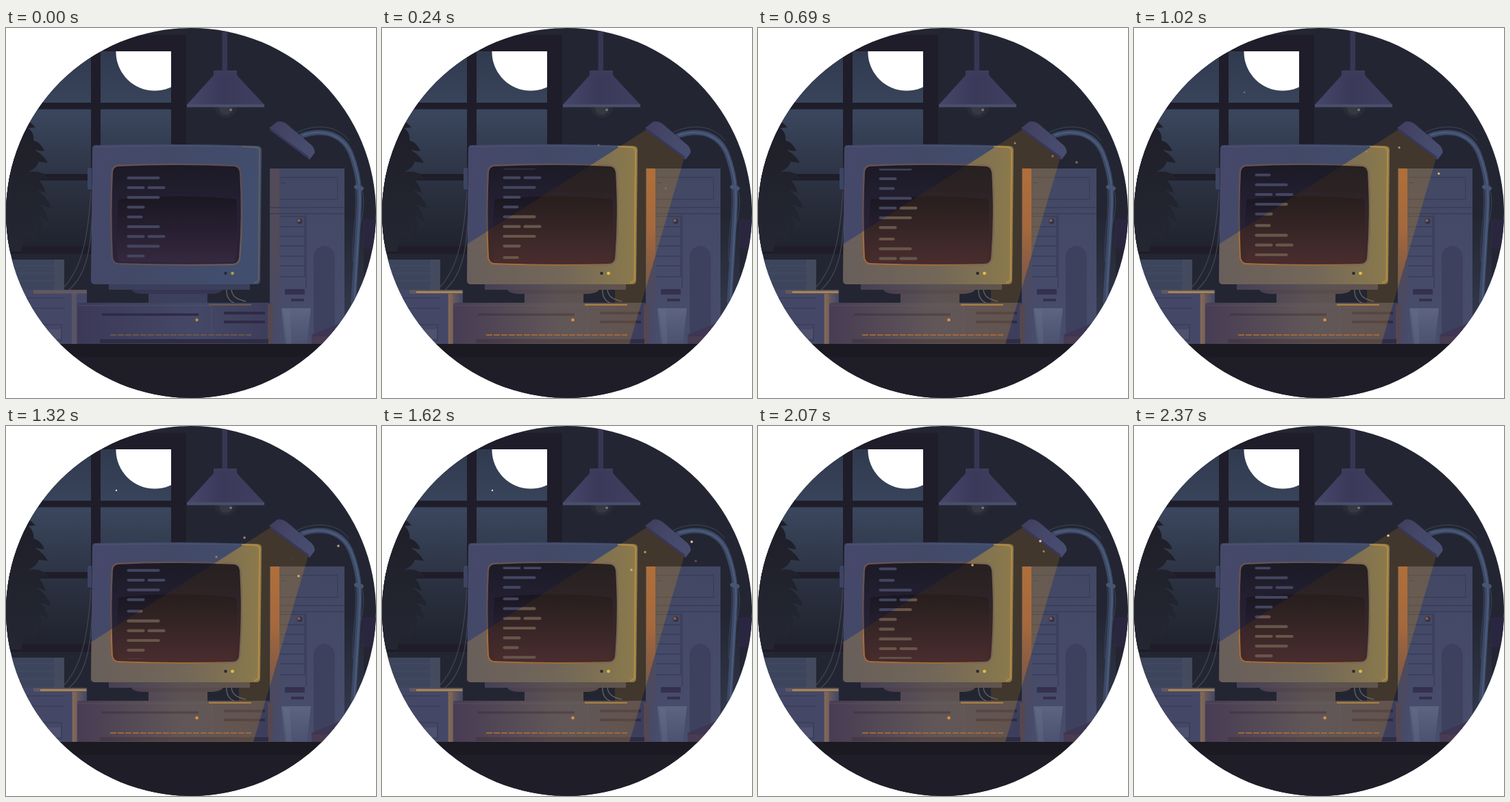
An HTML page that plays this animation: 540 by 540 pixels, repeating every 2400 ms.

```html
<!DOCTYPE html>
<html lang="en">
<head>
<meta charset="utf-8">
<title>Night desk</title>
<style>
html, body { margin: 0; width: 100%; height: 100%; overflow: hidden; background: #fff; }
svg { display: block; width: 100vw; height: 100vh; }
</style>
</head>
<body>
<svg viewBox="0 0 540 540" fill="none">
<defs>
  <clipPath id="stage"><circle cx="270" cy="270" r="270"/></clipPath>
  <clipPath id="pane"><path d="M0 34H241V330H0z"/></clipPath>
  <clipPath id="cone"><path d="M388 147L441 190L361 461H96V334L125 315z"/></clipPath>
  <clipPath id="text"><path d="M160 205.5H340V339.5H160z"/></clipPath>
  <linearGradient id="sky" x2="0" y2="1">
    <stop stop-color="#303a4f"/><stop offset=".32" stop-color="#3a465d"/>
    <stop offset=".65" stop-color="#2c3343"/><stop offset="1" stop-color="#21232e"/>
  </linearGradient>
  <linearGradient id="leaf" x2="0" y2="1">
    <stop stop-color="#1e1e28"/><stop offset=".35" stop-color="#20212b"/><stop offset="1" stop-color="#242732"/>
  </linearGradient>
  <linearGradient id="shade">
    <stop stop-color="#47476b"/><stop offset=".45" stop-color="#3b395a"/><stop offset="1" stop-color="#403f60"/>
  </linearGradient>
  <linearGradient id="haze" x2="0" y2="1">
    <stop stop-color="#343a50" stop-opacity="0"/><stop offset="1" stop-color="#363d53"/>
  </linearGradient>
  <linearGradient id="body" x2="1" y2=".25">
    <stop stop-color="#46486a"/><stop offset=".45" stop-color="#424967"/><stop offset="1" stop-color="#414e6d"/>
  </linearGradient>
  <linearGradient id="unit">
    <stop stop-color="#3c3957"/><stop offset=".6" stop-color="#444866"/><stop offset="1" stop-color="#3c3d5a"/>
  </linearGradient>
  <linearGradient id="tower" x2="0" y2="1">
    <stop stop-color="#424864"/><stop offset="1" stop-color="#474d6b"/>
  </linearGradient>
  <linearGradient id="edge" x2="0" y2="1">
    <stop stop-color="#554b57"/><stop offset=".5" stop-color="#504a5b"/><stop offset="1" stop-color="#464a69"/>
  </linearGradient>
  <linearGradient id="cup" x2="0" y2="1">
    <stop stop-color="#5c6480"/><stop offset="1" stop-color="#4b5270"/>
  </linearGradient>
  <linearGradient id="head" x2="1" y2=".6">
    <stop stop-color="#413d5d"/><stop offset=".5" stop-color="#454768"/><stop offset="1" stop-color="#484d70"/>
  </linearGradient>
  <linearGradient id="glass" x2="0" y2="1">
    <stop stop-color="#1b1a25"/><stop offset=".35" stop-color="#231f31"/><stop offset="1" stop-color="#2c2439"/>
  </linearGradient>
  <linearGradient id="gloss" x2="0" y2="1">
    <stop stop-color="#1a1721"/><stop offset=".45" stop-color="#251e2f"/><stop offset="1" stop-color="#35293f"/>
  </linearGradient>
  <linearGradient id="gold">
    <stop stop-color="#a08046" stop-opacity=".4"/><stop offset=".55" stop-color="#a88545" stop-opacity=".48"/>
    <stop offset="1" stop-color="#be9834" stop-opacity=".6"/>
  </linearGradient>
  <linearGradient id="amber" x2="0" y2="1">
    <stop stop-color="#46300f" stop-opacity=".26"/><stop offset=".45" stop-color="#4a2f12" stop-opacity=".32"/>
    <stop offset="1" stop-color="#5f301c" stop-opacity=".5"/>
  </linearGradient>
  <linearGradient id="ember">
    <stop stop-color="#5c434c" stop-opacity=".36"/><stop offset=".5" stop-color="#8a6c46" stop-opacity=".4"/>
    <stop offset="1" stop-color="#9a7438" stop-opacity=".4"/>
  </linearGradient>
  <linearGradient id="strip" x2="0" y2="1">
    <stop stop-color="#b06f3a"/><stop offset=".35" stop-color="#a5683d"/><stop offset="1" stop-color="#684846" stop-opacity=".2"/>
  </linearGradient>
  <linearGradient id="warm">
    <stop stop-color="#a07848" stop-opacity=".6"/><stop offset="1" stop-color="#a07848" stop-opacity="0"/>
  </linearGradient>
  <linearGradient id="rim" x2="1" y2="1">
    <stop stop-color="#6d5351"/><stop offset=".5" stop-color="#5b4d55"/><stop offset="1" stop-color="#705d54"/>
  </linearGradient>
  <linearGradient id="glow">
    <stop stop-color="#a86c3a"/><stop offset=".7" stop-color="#9a6a3e"/><stop offset="1" stop-color="#786a54"/>
  </linearGradient>
  <path id="case" d="M131 171Q250 168 366 172Q373 172 373 178L371 368Q371 374 365 374H130Q124 374 124 368L126 176Q126 171 131 171z"/>
  <path id="screen" d="M163 202Q250 198 333 202Q340 203 341 211Q345 275 340 336Q339 343 331 344Q248 346 164 343Q157 342 156 335Q153 272 156 210Q157 203 163 202z"/>
  <path id="code"/>
</defs>

<g clip-path="url(#stage)">
  <path fill="#232632" d="M0 0H540V540H0z"/>

  <!-- window -->
  <path fill="#1f1d29" d="M0 10H263V330H0z"/>
  <path fill="url(#sky)" d="M0 34H241V318H0z"/>
  <circle cx="217" cy="35" r="56.5" fill="#fff" clip-path="url(#pane)"/>
  <path fill="#1f1d29" d="M124 34H138V330H124zM0 109H241V118.500H0zM0 213H241V222.500H0z"/>
  <path fill="url(#leaf)" d="M0 125Q30 130 43 145L33 146Q42 155 40 164Q52 168 56 180L42 178Q56 186 61 197L48 195Q46 203 33 210Q55 207 62 220L46 220Q55 229 58 241L45 236Q60 246 66 263L50 258Q60 269 62 283L48 273Q54 286 51 296L40 285Q46 302 40 312L28 300L22 326H0z"/>

  <!-- ceiling lamp -->
  <circle cx="321" cy="114" r="17" fill="#292b36"/>
  <circle cx="321" cy="117" r="10" fill="#353741"/>
  <circle cx="328" cy="119.500" r="1.800" fill="#7b7a7a"/>
  <path fill="#393555" d="M315.500 0H323V63H315.500z"/>
  <path fill="#3e3b5a" d="M303 62H337V70H303z"/>
  <path fill="url(#shade)" d="M303 69H337L377 112H264z"/>
  <path fill="#4a506c" d="M264 111.500H377V115.500H264z"/>

  <!-- back right -->
  <path fill="#2b2640" d="M521 279H540V322H521z"/>
  <path fill="url(#haze)" d="M494 275H522V461H494z"/>

  <!-- tower -->
  <path fill="url(#tower)" d="M385 205H494V461H385z"/>
  <path fill="url(#edge)" d="M386 206H399V461H386z"/>
  <g stroke="#3a3d59" stroke-width="1.300">
    <path d="M400 218H484V250H400M385 262H494M385 271H494M401 226H408"/>
    <path d="M400 275H436V363H400M400 290H436M400 304H436M400 318H436M400 333H436M400 347H436M438 271V380"/>
  </g>
  <path fill="#3d415e" d="M449 461V334A15.500 16 0 0 1 480 334V461z"/>
  <path fill="#35304d" d="M407 381H436V389H407zM416 395H435V399H416z"/>
  <circle cx="428.500" cy="282" r="4" fill="#34304a"/>
  <circle cx="427.500" cy="281" r="2.200" fill="#8b5e45"/>

  <!-- desk lamp -->
  <g stroke-linecap="round">
    <path stroke="#3b4560" d="M424 153C452 138 486 143 500 164M519 235C532 275 498 310 510 392M510 236C512 280 505 300 506 340"/>
    <path stroke="#3d4864" stroke-width="7.500" d="M432 157C466 146 493 156 504 185C514 212 517 235 515 268L507 400"/>
    <path stroke="#495b7c" stroke-width="2.500" d="M434 156C466 146 494 158 505 186C515 214 518 236 516 268L508.500 396"/>
    <path stroke="#475472" stroke-width="6" d="M511 232L519 234"/>
  </g>

  <!-- cup and book -->
  <path fill="#3e3652" d="M446 448L494 428V461H446z"/>
  <path fill="#473c52" d="M446 450H494V461H446z"/>
  <path fill="url(#cup)" d="M402 409H445L439 461H407z"/>
  <path fill="#677089" opacity=".35" d="M405 411H414L417 461H409z"/>

  <!-- left boxes -->
  <path fill="#3d455d" d="M0 338H85V382H0z"/>
  <path fill="#4a505f" opacity=".6" d="M70 338H85V382H70z"/>
  <path stroke="#454d66" d="M0 347H70M0 358H70M0 369H70"/>
  <path fill="#444866" d="M0 382H118V461H0z"/>
  <path fill="#585367" d="M96 386H103V461H96z"/>
  <path fill="#62595f" d="M40 382.500H116Q119 383 118 387.500H40z"/>
  <path stroke="#3a3d59" stroke-width="1.500" d="M28 394H86M28 409H86M50 433H81V456H50z"/>
  <path fill="#4f526c" d="M54 440H80V454H60z"/>
  <path stroke="#434858" stroke-width="1.100" d="M124 238C120 300 112 352 82 381M126 244C126 320 118 360 92 382"/>

  <!-- light on the wall and tower -->
  <g class="lit">
    <g clip-path="url(#cone)">
      <path fill="#c58712" fill-opacity=".18" d="M340 140H450V461H340z"/>
      <path fill="#bd8d35" fill-opacity=".13" d="M385 205H494V461H385z"/>
      <path fill="url(#strip)" d="M386 205H399V461H386z"/>
    </g>
    <path fill="url(#warm)" d="M97 388H117V461H97z"/>
    <path stroke="#a98552" stroke-width="3" d="M50 385.500H117"/>
  </g>
  <path stroke="#68665f" stroke-width="1.300" d="M322 380C321 392 326 399 333 401M329 380C329 391 336 396 350 399"/>
  <path fill="url(#head)" d="M384 146L396 136.500Q402 135 409 139.500L446 171Q452 178 450 183L443 192z"/>
  <path stroke="#39375a" stroke-width="3" d="M386 148L442 189.500"/>

  <!-- system unit -->
  <path fill="#3c405c" d="M208 386H294V402H208z"/>
  <path fill="#373552" d="M183 381H317Q313 388 300 388H198Q185 388 183 381z"/>
  <path fill="#3a3f5b" d="M150 374H356V382H150z"/>
  <path fill="url(#unit)" d="M108 401H384Q388 401 388 406V461H104V406Q104 401 108 401z"/>
  <path fill="#54474f" d="M382 403H389V461H382z"/>
  <path stroke="#4d506c" d="M300 404V448M105 405H300"/>
  <path stroke="#6e594f" stroke-width="1.800" d="M296 404H358"/>
  <path fill="#302a45" d="M140 416.500H281V420H140zM318 414H378V418H318zM318 427H378V431H318z"/>
  <path fill="#302c45" d="M137 454H383V460H137z"/>
  <path stroke="#6a554f" stroke-width="1.800" stroke-dasharray="9 2" d="M152 448H358"/>
  <circle cx="278.500" cy="426" r="2.200" fill="#c0893c"/>

  <!-- monitor -->
  <path fill="#3b4462" d="M125 204H121Q119 204 119 207V233Q119 236 122 236H125z"/>
  <use href="#case" fill="url(#body)"/>
  <path stroke="#505675" d="M129 173.500Q250 170.500 364 174"/>
  <path id="trim" stroke="#69635e" stroke-width="1.500" d="M344 173L364 174Q370 174.500 370 180L368.500 366Q368 371 362 371.500"/>

  <g class="lit">
    <g clip-path="url(#cone)">
      <use href="#case" fill="url(#gold)"/>
      <path fill="url(#ember)" d="M150 374H356V382H317Q313 388 294 388V401H208V388Q185 388 183 382H150z"/>
      <path fill="url(#ember)" d="M104 401H388V461H104z"/>
    </g>
    <path stroke="#bd8d42" stroke-width="1.600" d="M344 173L364 174Q370 174.500 370 180L368.500 366Q368 371 362 371.500M296 404H358"/>
    <path stroke="#a0673d" stroke-width="1.800" stroke-dasharray="9 2" d="M152 448H358"/>
  </g>

  <use href="#screen" stroke="url(#rim)" stroke-width="4.500"/>
  <use href="#screen" class="lit" stroke="url(#glow)" stroke-width="4.500" clip-path="url(#cone)"/>
  <use href="#screen" fill="url(#glass)"/>
  <path fill="url(#gloss)" d="M164 250Q250 241 336 250Q340 296 334 342Q250 344 164 341Q160 296 164 250z"/>
  <g class="lit" clip-path="url(#cone)"><use href="#screen" fill="url(#amber)"/></g>
  <g clip-path="url(#text)" stroke-width="4" stroke-linecap="round">
    <use href="#code" stroke="#444660"/>
    <g class="lit" clip-path="url(#cone)"><use href="#code" stroke="#685648"/></g>
  </g>
  <circle cx="320.500" cy="358" r="2.200" fill="#292831"/>
  <circle cx="330.500" cy="358" r="2.300" fill="#a9a348"/>
  <circle class="lit" cx="330.500" cy="358" r="2.300" fill="#e4bd3c"/>
  <circle class="lit" cx="278.500" cy="426" r="2.200" fill="#d6923c"/>

  <!-- table -->
  <path fill="#1f1e28" d="M0 461H540V540H0z"/>
  <path fill="#1b1a23" d="M0 461H540V480H0z"/>

  <circle id="star" cx="161" cy="94" r="1.200" fill="#dfe3ea"/>
  <g id="dust"></g>
</g>
</svg>
<script>
const LOOP = 2400, STEP = 30, FADE_IN = 400, FADE_OUT = 100;
const $ = id => document.getElementById(id);
const lit = document.querySelectorAll('.lit');
const clamp = v => Math.max(0, Math.min(1, v));

// Code rows: long, double, long, medium, short
const ROWS = ['M178.500 yH222.500', 'M178.500 yH200.500M208.500 yH230.500', 'M178.500 yH222.500',
  'M178.500 yH200.500', 'M178.500 yH197.500'];

// Dust motes: colour, radius, then path points [time, x, y]
const MOTES = [
  ['#f0c99a', 1.8, [1020, 483, 186], [1200, 490, 181], [1320, 485, 175], [1620, 452, 169], [2070, 412, 168], [2370, 371, 160], [2500, 353, 156]],
  ['#d8ad70', 1.8, [480, 467, 199], [690, 465, 196], [1000, 446, 212], [1320, 427, 219], [1620, 364, 210], [2070, 313, 203], [2190, 300, 200]],
  ['#a8875e', 1.7, [390, 468, 197], [690, 430, 187], [1320, 348, 163], [1470, 330, 158]],
  ['#a0835c', 1.6, [30, 430, 255], [240, 414, 234], [690, 375, 168], [1320, 307, 191], [1440, 294, 195]],
  ['#928b78', 1.4, [30, 341, 169], [240, 316, 171], [360, 300, 172]],
  ['#e0a660', 1.8, [1300, 420, 193], [1620, 384, 184], [1830, 358, 178]],
  ['#a58a70', 1.5, [1410, 459, 199], [1620, 458, 197], [2070, 417, 183], [2190, 406, 180]]
].map(([color, r, ...path]) => {
  const el = document.createElementNS('http://www.w3.org/2000/svg', 'circle');
  el.setAttribute('r', r);
  el.setAttribute('fill', color);
  $('dust').append(el);
  return { el, path };
});

function drawCode(t) {
  let d = '';
  for (let i = 0; i < 20; i++) {
    const y = 218.7 + 14.25 * i + 2.5 * Math.floor((i + 1) / 10) - t * 0.06;
    if (y > 200 && y < 345) d += ROWS[i % 5].replaceAll('y', y.toFixed(2));
  }
  $('code').setAttribute('d', d);
}

function drawMote({ el, path }, t) {
  const start = path[0][0], end = path[path.length - 1][0];
  el.style.opacity = clamp((t - start) / FADE_IN) * clamp((end - t) / FADE_OUT);
  const i = path.findIndex(p => p[0] > t);
  if (i < 1) return;
  const [t0, x0, y0] = path[i - 1], [t1, x1, y1] = path[i];
  const k = (t - t0) / (t1 - t0);
  el.setAttribute('cx', x0 + (x1 - x0) * k);
  el.setAttribute('cy', y0 + (y1 - y0) * k);
}

function lamp(t) {
  if (t < 60) return 0;
  return t >= 1170 && t < 1230 ? 0.5 : 1;
}

function draw(now) {
  const t = Math.floor((now % LOOP) / STEP + 1e-4) * STEP;
  const glow = lamp(t);
  lit.forEach(el => el.style.opacity = glow);
  $('star').style.opacity = clamp((t - 900) / 360) * clamp((1980 - t) / 300);
  drawCode(t);
  MOTES.forEach(m => drawMote(m, t));
}

const begin = performance.now();
function tick() {
  draw(performance.now() - begin);
  requestAnimationFrame(tick);
}
tick();
</script>
</body>
</html>
```
